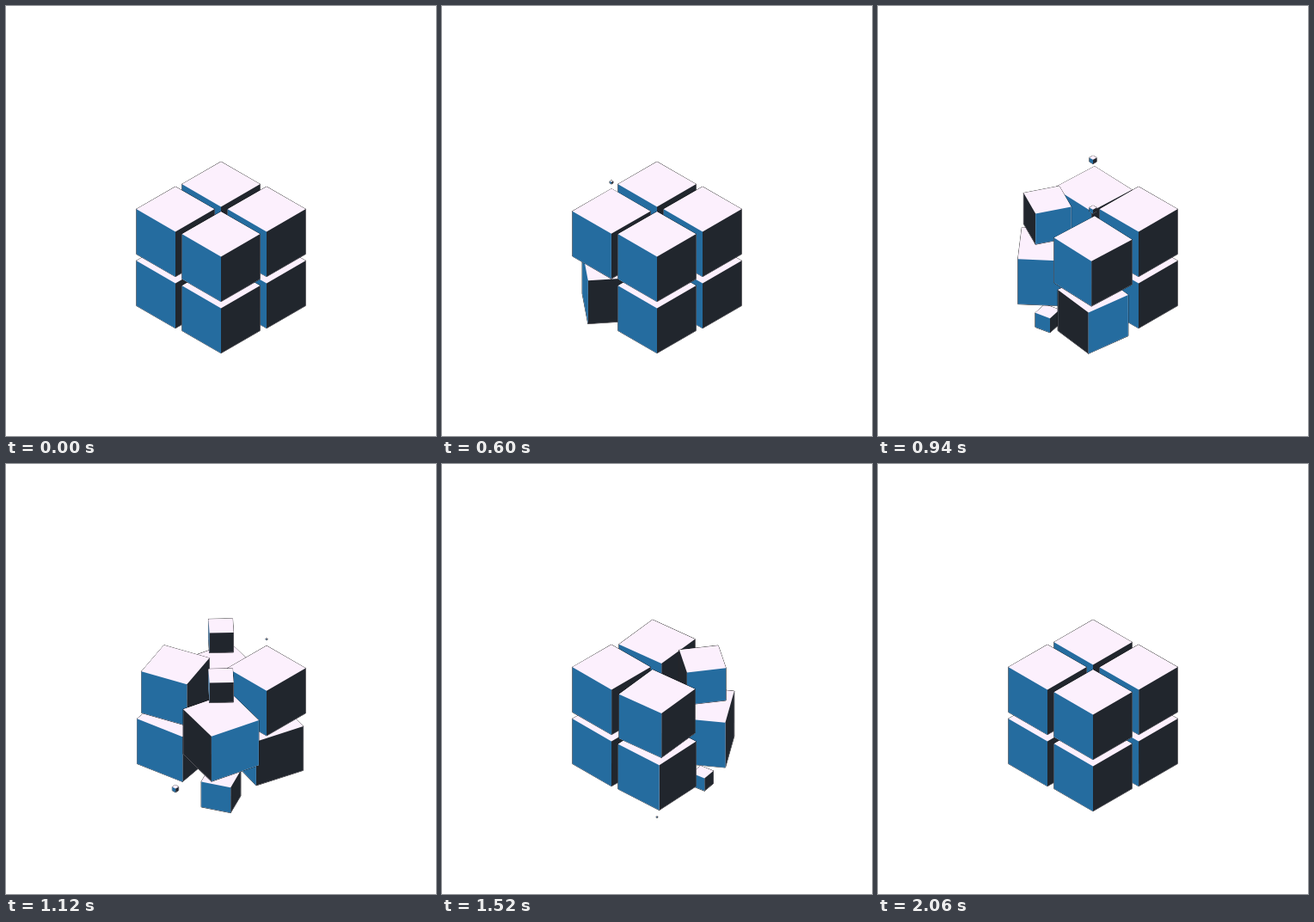
An HTML page with a canvas for the animation above (2.44 s loop, 500 by 500 pixels).

```html
<!DOCTYPE html>
<html>
<head>
<meta charset="utf-8">
<title>Turning cubes</title>
<style>
html, body { margin: 0; width: 100%; height: 100%; overflow: hidden; background: #fff; }
canvas { display: block; }
</style>
</head>
<body>
<canvas id="stage" width="500" height="500"></canvas>
<script>
const ctx = document.getElementById('stage').getContext('2d');
const LOOP = 2440, STEP = 20, COLUMN_LAG = 280;
const RADIUS = 64 / Math.SQRT2, TILT = 1 / Math.sqrt(3);
const CENTER = 250, BACK = 233.4, SIDE = 53, ROW = 29, RISE = 60;
const TOP = '#fcf0fd', BLUE = '#256c9f', DARK = '#21262d', LINE = '#111';

// Speeds up until mid, then slows down until end.
function ease(t, start, mid, end, power) {
  if (t <= start) return 0;
  if (t >= end) return 1;
  return t < mid
    ? .5 * ((t - start) / (mid - start)) ** power
    : 1 - .5 * ((end - t) / (end - mid)) ** power;
}

const drop = t => ease(t, 400, 860, 1430, 3);
const spin = t => Math.PI * ease(t, 520, 810, 1700, 5);

// Bottom cubes turn first, arriving ones last.
const SPIN_LAG = [-165, 0, 70];

// Back to front: side (-1 left, 1 right) and depth row.
const columns = [[0, 0], [-1, 1], [1, 1], [0, 2]];

function shape(points) {
  const path = new Path2D();
  points.forEach(([x, y]) => path.lineTo(x, y));
  path.closePath();
  return path;
}

function cube(x, y, size, angle) {
  if (size < .0025) return;
  const r = RADIUS * size, h = r * TILT;
  const corner = (k, dy) => {
    const a = angle + k * Math.PI / 2;
    return [x + r * Math.cos(a), y + h * Math.sin(a) + dy];
  };
  const faces = [[TOP, shape([0, 1, 2, 3].map(k => corner(k, -h)))]];
  for (let k = 0; k < 4; k++) {
    if (Math.sin(angle + (k + .5) * Math.PI / 2) <= 0) continue;
    faces.push([k % 2 ? BLUE : DARK,
      shape([corner(k, h), corner(k + 1, h), corner(k + 1, -h), corner(k, -h)])]);
  }

  // A light body under the faces keeps the inner edges bright.
  const body = new Path2D();
  faces.forEach(([, path]) => body.addPath(path));
  ctx.strokeStyle = LINE;
  ctx.lineJoin = 'round';
  ctx.stroke(body);
  ctx.fillStyle = TOP;
  ctx.fill(body);
  for (const [color, path] of faces) {
    ctx.fillStyle = color;
    ctx.fill(path);
  }
}

function draw(t) {
  ctx.fillStyle = '#fff';
  ctx.fillRect(0, 0, 500, 500);
  for (const [side, row] of columns) {
    const time = t - (side + 1) * COLUMN_LAG;
    const p = drop(time);
    [1 - p, 1, p].forEach((size, level) => {
      const y = BACK + ROW * row + RISE * (1 - level + p);
      cube(CENTER + SIDE * side, y, size, spin(time - SPIN_LAG[level]));
    });
  }
}

const start = performance.now();
function tick() {
  const t = (performance.now() - start) % LOOP;
  draw(Math.floor(t / STEP) * STEP);
  requestAnimationFrame(tick);
}
tick();
</script>
</body>
</html>
```
